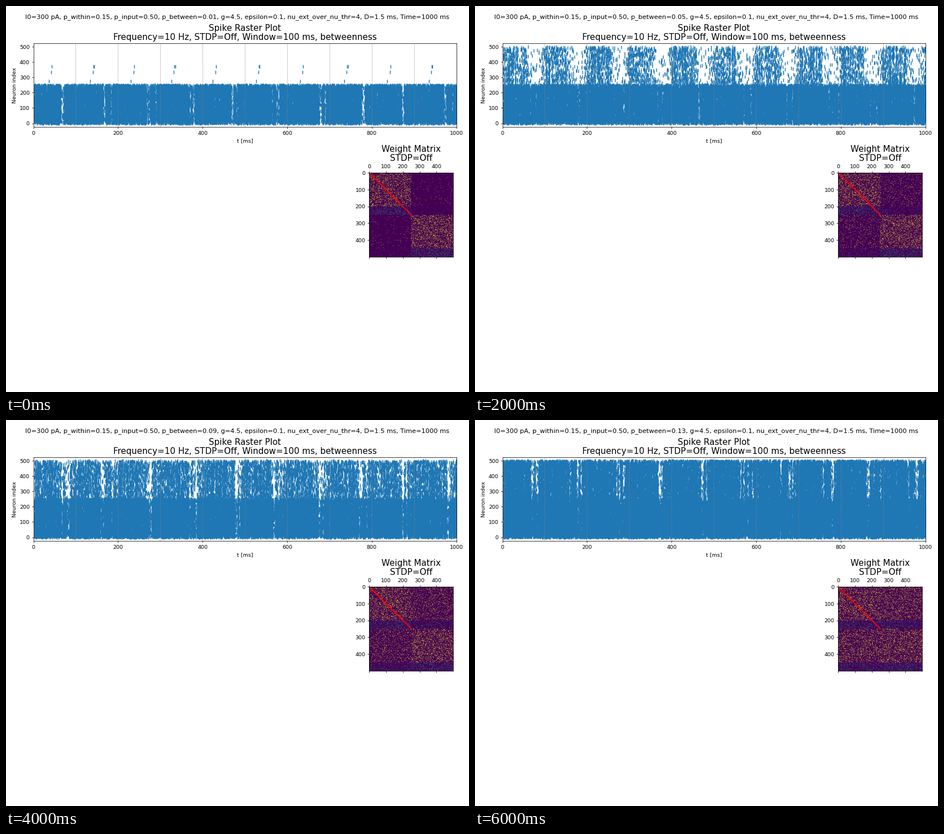
Write a matplotlib script that moves like this. It is 820 by 683 pixels and loops after 8000 ms.

```python
import numpy as np
import matplotlib.pyplot as plt
from matplotlib.animation import FuncAnimation

WIDTH, HEIGHT, DPI = 820, 683, 68.334
FIG_W, FIG_H = 12, 10
HALF, DURATION, PERIOD = 250, 1000, 100  # neurons per population, ms, ms
EXCITATORY = 200
SAMPLES = 218  # sampled rows and columns of the weight matrix

# Rates are in spikes per ms; "dips" counts the short pauses in each cycle.
SCENES = [
    dict(low=0.15, low_depth=0.85, dips=3, up=0),
    dict(low=0.15, low_depth=0.72, dips=2, up=0.034, up_depth=0.4, swing=2.2, burst=4, spread=0.7),
    dict(low=0.16, low_depth=0.75, dips=3, up=0.062, up_depth=0.92, swing=0.5, burst=5, spread=0.5),
    dict(low=0.19, low_depth=0.5, dips=4, up=0.13, up_depth=0.86, swing=0.2, burst=15, spread=0.1),
]


def draw_spikes(rng, first, rate, weight):
    """Random spikes of one population, given its rate over time and per neuron."""
    fired = rng.random((HALF, DURATION)) < weight[:, None] * rate[None, :]
    index, ms = np.nonzero(fired)
    return ms + rng.random(ms.size), index + first


def lone_spikes():
    """Three neurons that follow the drive; the last fires twice in odd cycles."""
    cycle = np.arange(DURATION // PERIOD)
    peak = PERIOD * cycle + 36.5 + 6 * np.cos(2 * np.pi * cycle / 8)
    trains = {275: peak - 6, 333: peak, 372: np.append(peak + 1.5, peak[1::2] + 3)}
    return (np.concatenate(list(trains.values())),
            np.repeat(list(trains), [len(train) for train in trains.values()]))


def raster(scene, rng):
    t = np.arange(DURATION) + 0.5
    starts = np.repeat(np.arange(0, DURATION, PERIOD), scene["dips"])
    centers = starts + rng.normal(77, 9, starts.size)
    dips = np.exp(-((t[:, None] - centers) / 2) ** 2).sum(axis=1).clip(0, 1)
    started = t > 2

    low_rate = scene["low"] * (1 - scene["low_depth"] * dips) * started
    low = draw_spikes(rng, 0, low_rate, np.ones(HALF))

    if scene["up"] == 0:
        up = lone_spikes()
    else:
        drive = np.cos(2 * np.pi * (t - 26) / PERIOD)
        cycle = np.exp(scene["swing"] * np.minimum(drive, 0))
        burst = rng.gamma(scene["burst"], 1 / scene["burst"], DURATION)
        rate = scene["up"] * cycle * burst * (1 - scene["up_depth"] * dips) * started
        weight = rng.gamma(3, 1 / 3, HALF) ** scene["spread"]
        up = draw_spikes(rng, HALF, rate, weight)
    return np.concatenate([low[0], up[0]]), np.concatenate([low[1], up[1]])


def weights(p_between, rng):
    """Connection strengths: excitatory rows strong, inhibitory rows weaker."""
    neuron = np.linspace(0, 2 * HALF - 1, SAMPLES).astype(int)
    population = neuron // HALF
    same = population[:, None] == population[None, :]
    linked = rng.random(same.shape) < np.where(same, 0.15, p_between)
    strength = np.where(neuron % HALF < EXCITATORY, 1.0, 0.45)
    return linked * strength[:, None]


def add_axes(left, top, right, bottom):
    return fig.add_axes([left / WIDTH, 1 - bottom / HEIGHT,
                         (right - left) / WIDTH, (bottom - top) / HEIGHT])


def add_title(axes, text):
    axes.set_title(text, fontsize=16, linespacing=1.1)


plt.rcParams["font.family"] = "DejaVu Sans"
fig = plt.figure(figsize=(FIG_W, FIG_H), dpi=DPI, facecolor="white")
heading = fig.suptitle("")

ax = add_axes(48.5, 66, 797.5, 214.5)
spike_marks, = ax.plot([], [], "|", color="C0", markersize=6, markeredgewidth=1.5)
for ms in range(PERIOD, DURATION, PERIOD):
    ax.axvline(ms, color="gray", linestyle="--", linewidth=0.6)
ax.set(xlim=(0, DURATION), ylim=(-24.95, 523.95), xlabel="t [ms]", ylabel="Neuron index")
add_title(ax, "Spike Raster Plot\nFrequency=10 Hz, STDP=Off, Window=100 ms, betweenness")

ax_w = add_axes(643, 295, 792, 443.8)
edge = 2 * HALF - 0.5
matrix = ax_w.matshow(np.zeros((SAMPLES, SAMPLES)), cmap="viridis", vmin=0, vmax=1,
                      extent=(-0.5, edge, edge, -0.5),
                      interpolation="antialiased", interpolation_stage="rgba")
ax_w.plot([0, HALF], [0, HALF], color="red", linewidth=2)
ax_w.set(xlim=(-0.5, edge), ylim=(edge, -0.5))
add_title(ax_w, "Weight Matrix\nSTDP=Off")


def update(frame):
    rng = np.random.default_rng(40 + frame)
    p_between = 0.01 + 0.04 * frame
    heading.set_text(
        f"I0=300 pA, p_within=0.15, p_input=0.50, p_between={p_between:.2f}, g=4.5, "
        "epsilon=0.1, nu_ext_over_nu_thr=4, D=1.5 ms, Time=1000 ms")
    spike_marks.set_data(*raster(SCENES[frame], rng))
    matrix.set_data(weights(p_between, rng))
    return heading, spike_marks, matrix


animation = FuncAnimation(fig, update, frames=len(SCENES), interval=2000,
                          repeat=True, repeat_delay=0, blit=False)
plt.show()
```
